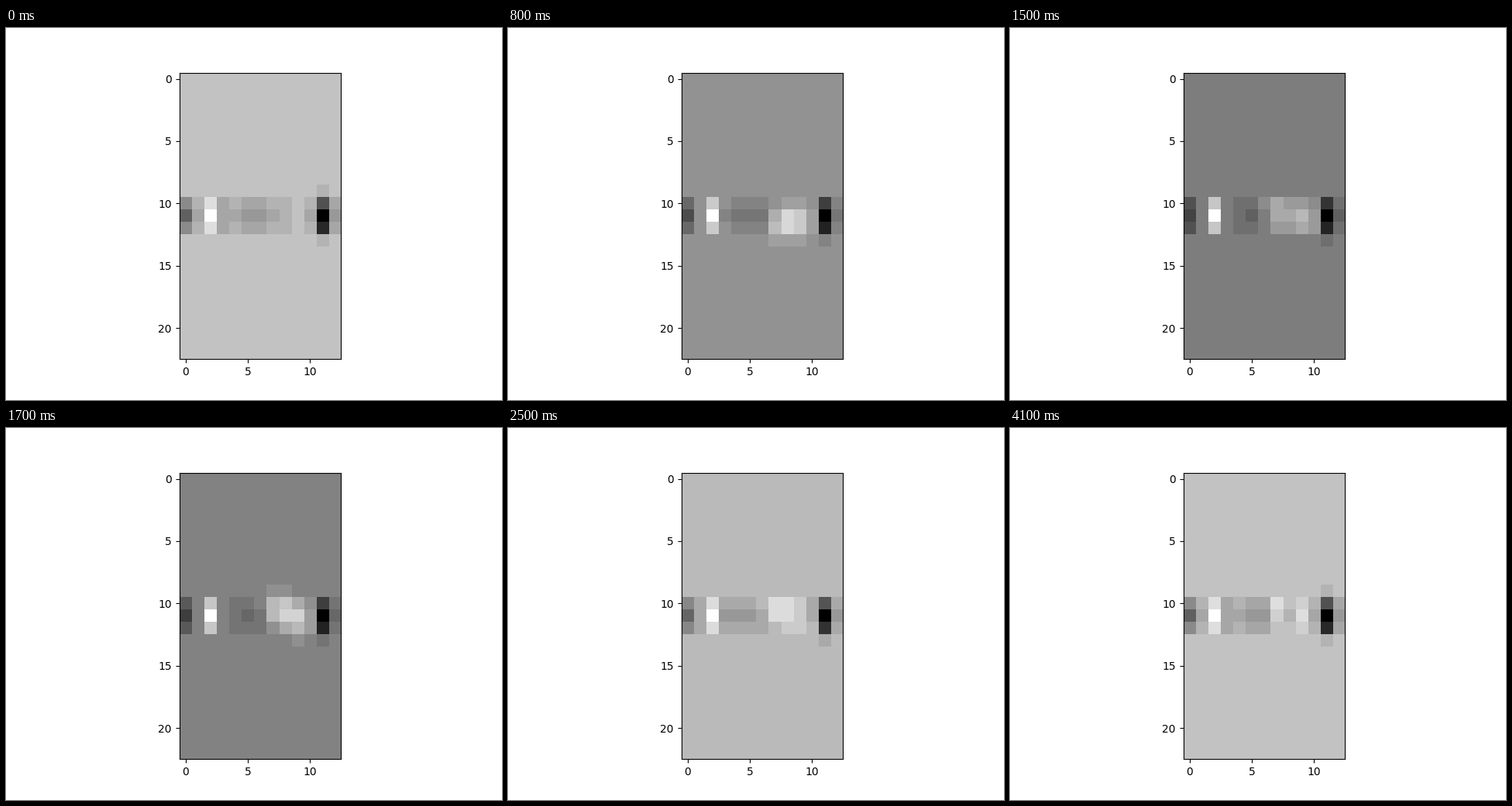
Animation, 640 px wide and 480 px high, one loop 4.2 s. Source, as a matplotlib script:

```python
import numpy as np
import matplotlib.pyplot as plt
from matplotlib.animation import FuncAnimation

ROWS, COLS, FRAMES = 23, 13, 42
row, col = np.mgrid[:ROWS, :COLS]

# Key points: (frame, background grey, grey step)
TONE = [(2, 194, 14), (8, 146, 14), (12, 118, 16), (17, 130, 13.6),
        (25, 186, 17), (33, 178, 12), (38, 194, 14)]

# Two bright spots wander over the strip: (frame, column, row, brightness)
LEFT_SPOT = [(2, 7.2, 11.2, 0), (8, 7.6, 11.5, 70), (12, 6.6, 11.4, 55),
             (17, 7.3, 10.5, 80), (25, 7.2, 10.7, 60), (33, 7.2, 11, 12),
             (41, 7, 10.7, 55)]
RIGHT_SPOT = [(2, 9, 11.2, 0), (8, 9.2, 11.4, 45), (12, 9.6, 11.2, 40),
              (17, 9.1, 11.2, 75), (25, 8.9, 11.4, 25), (33, 9, 11.4, 22),
              (41, 9, 11, 34)]


def bump(distance, width):
    return np.exp(-0.5 * np.abs(distance / width) ** 2.5)


def line(column, strength, centre=11, width=1):
    """A fixed echo: one column, fading above and below its centre."""
    return strength * (col == column) * bump(row - centre, width)


def track(points, frame):
    times, *values = zip(*points)
    return [np.interp(frame, times, v) for v in values]


RIDGE = 0.23 * bump(col - 5.6, 1.7) * bump(row - 11, 1)
DARK = (RIDGE + line(0, 0.5, width=0.97) + line(10, 0.12)
        + line(11, 1.1, 11.12) + line(12, 0.22))
BRIGHT = line(2, 1.1, width=0.9)
FAINT = line(1, 0.45) + line(3, 0.45)  # darker or lighter with the background


def spot(points, frame):
    x, y, power = track(points, frame)
    width = np.interp(frame, [33, 41], [0.9, 0.5])
    return power * bump(col - x, width) * bump(row - y, 1)


def picture(frame):
    base, step = track(TONE, frame)
    signal = (255 - base) * BRIGHT - base * DARK + (140 - base) * FAINT
    signal += spot(LEFT_SPOT, frame) + spot(RIGHT_SPOT, frame)
    return np.clip(base + step * np.round(signal / step), 0, 255)


fig, ax = plt.subplots(figsize=(6.4, 4.8), dpi=100)
image = ax.imshow(picture(0), cmap="gray", vmin=0, vmax=255,
                  interpolation="nearest")


def update(frame):
    image.set_data(picture(frame))
    return [image]


anim = FuncAnimation(fig, update, frames=FRAMES, interval=100,
                     repeat=True, repeat_delay=0)
plt.show()
```
